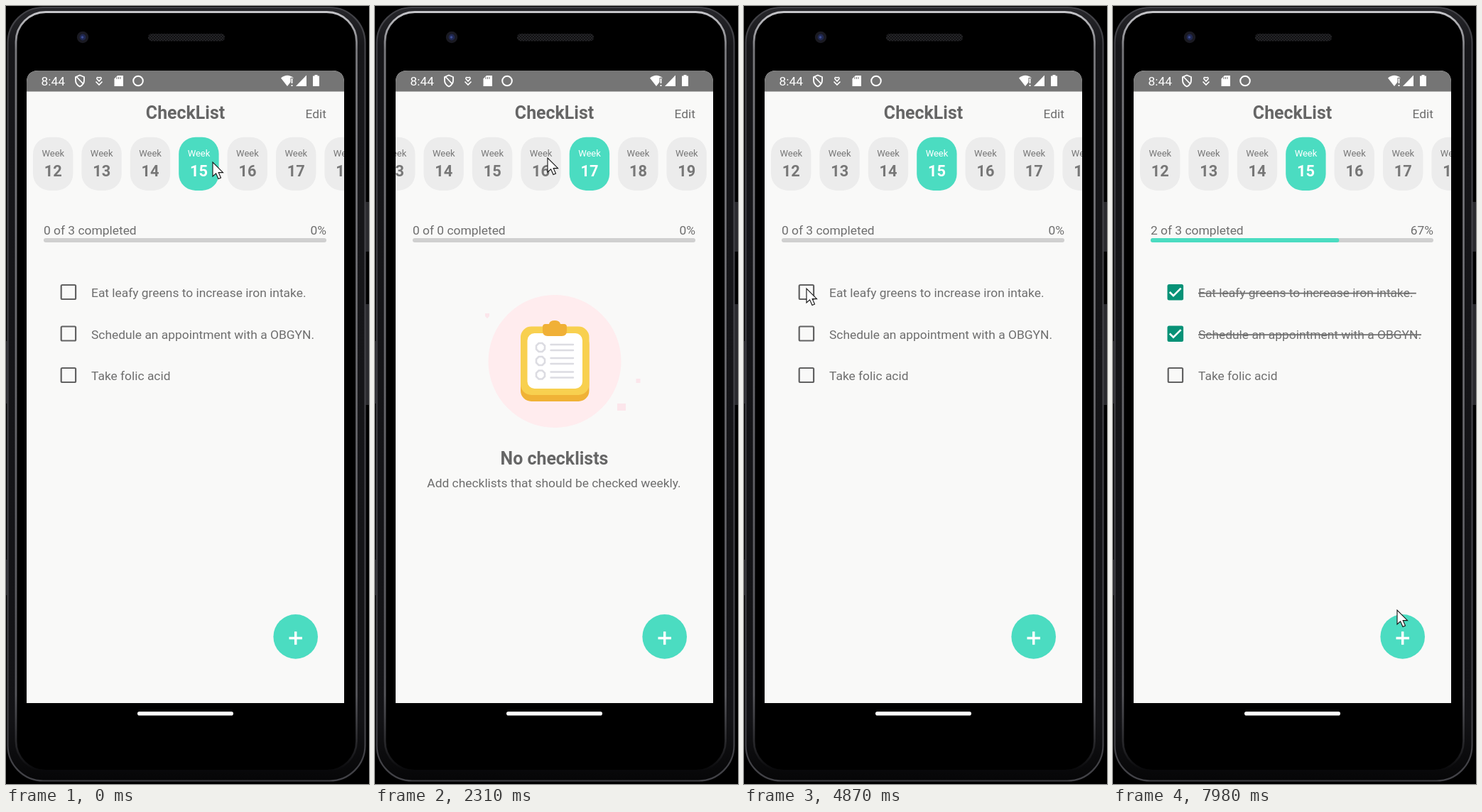
Animation of 511 by 1096 pixels, one loop 8000 ms. Source, as an HTML page:

```html
<!DOCTYPE html>
<html lang="en">
<head>
<meta charset="utf-8">
<title>Weekly checklist</title>
<style>
  html, body { margin: 0; width: 100%; height: 100%; overflow: hidden; background: #000; }
  svg { display: block; width: 100%; height: 100%; }
  text { font-family: Roboto, "Liberation Sans", sans-serif; font-size: 17.4px; fill: #6e6e6e; white-space: pre; }
  .title { font-size: 24.9px; font-weight: 700; fill: #666; }
  .done { text-decoration: line-through; }
  .week { font-size: 13px; text-anchor: middle; }
  .num { font-size: 21.8px; font-weight: 700; text-anchor: middle; }
  .mid { text-anchor: middle; }
  .end { text-anchor: end; }
</style>
</head>
<body>
<svg viewBox="0 0 511 1096" xmlns="http://www.w3.org/2000/svg">
  <defs>
    <clipPath id="screen"><path d="M29 982V108Q29 91 46 91H459Q476 91 476 108V982Z"/></clipPath>
    <linearGradient id="rim" x2="0" y2="1">
      <stop offset="0" stop-color="#c4c4c8"/><stop offset=".05" stop-color="#77777b"/>
      <stop offset=".9" stop-color="#55555a"/><stop offset=".97" stop-color="#222225"/>
      <stop offset="1" stop-color="#08080a"/>
    </linearGradient>
    <linearGradient id="metal" x2="0" y2="1">
      <stop offset="0" stop-color="#26262a"/><stop offset=".05" stop-color="#17171a"/>
      <stop offset=".92" stop-color="#131316"/><stop offset="1" stop-color="#060607"/>
    </linearGradient>
    <pattern id="mesh" width="4" height="4" patternUnits="userSpaceOnUse">
      <rect width="4" height="4" fill="#111113"/><path d="M0 0H2V2H0ZM2 2H4V4H2Z" fill="#252528"/>
    </pattern>
  </defs>

  <rect width="511" height="1096"/>
  <path d="M506 276h5v70h-5zM506 420h5v142h-5zM0 472h1.500v88H0zM0 780h1.500v50H0z" fill="#2a2a2e"/>
  <rect x="2.500" y="2" width="503" height="1089.500" rx="50" fill="url(#metal)" stroke="#424247" stroke-width="2.200"/>
  <rect x="14" y="8.500" width="479.500" height="1069" rx="42" stroke="url(#rim)" stroke-width="2.800"/>
  <circle cx="108" cy="44" r="8.200" fill="#1a1a22"/>
  <circle cx="108" cy="44" r="4.400" fill="#202850"/>
  <circle cx="107.500" cy="44" r="1.800" fill="#3d4d94"/>
  <rect x="200" y="39" width="108" height="10.500" rx="5" fill="url(#mesh)"/>
  <rect x="185" y="994" width="135" height="5.600" rx="2.800" fill="#fff"/>

  <g clip-path="url(#screen)">
    <rect x="29" y="91" width="447" height="891" fill="#f9f9f8"/>
    <rect x="29" y="91" width="447" height="29.500" fill="#757575"/>
    <text x="49.500" y="112" style="fill:#fff">8:44</text>
    <g fill="none" stroke="#fff" stroke-width="1.800">
      <path d="M104 97.500L110 100V105Q110 110.500 104 113.500Q98 110.500 98 105V100ZM99 99.500L109 110"/>
      <path d="M131 106L128 102.700Q127.500 99.500 131 101Q134.500 99.500 134 102.700ZM126.500 106.500L131 111L135.500 106.500" stroke-width="1.600"/>
      <circle cx="186" cy="105.500" r="6.800" stroke-width="2"/>
    </g>
    <g fill="#fff">
      <path d="M157 98H165V113H152.500V102.500Z"/>
      <path d="M387 101.500Q396 94 405 101.500L396 113Z"/>
      <path d="M423 97.500V113H408Z"/>
      <path d="M434.500 97H438.500V98.500H441V113H432V98.500H434.500Z"/>
    </g>
    <path d="M156 100v3M158.500 100v3M161 100v3" stroke="#757575"/>
    <path d="M402.500 101V109M402.500 110.500V113" stroke="#757575" stroke-width="4"/>
    <path d="M402.500 102V109M402.500 111V113" stroke="#fff" stroke-width="1.800"/>

    <text class="title mid" x="252.500" y="159">CheckList</text>
    <text class="end" x="451" y="157.500">Edit</text>
    <g id="weeks"></g>
    <text id="count" x="53" y="322"></text>
    <text id="percent" class="end" x="451" y="322"></text>
    <rect x="53" y="327" width="398" height="6" rx="3" fill="#d0d0d0"/>
    <rect id="bar" x="53" y="327" height="6" rx="3" fill="#4bdcc1"/>
    <g id="panels"></g>
    <circle cx="407.700" cy="888.400" r="31.300" fill="#4bdcc1"/>
    <path d="M398.500 890.500H417M407.700 881.300V899.700" stroke="#fff" stroke-width="3.500"/>
  </g>
  <path id="cursor" d="M0 0V20L4.600 15.800L8 23.500L11.500 22L8.200 14.600H14.500Z" fill="#fff" stroke="#111" stroke-width="1.100"/>
</svg>

<script>
const LOOP = 8000, PITCH = 68.4, TEAL = '#4bdcc1';
const $ = id => document.getElementById(id);

// Week taps: time, week chosen, resting centre of week 15 afterwards
const taps = [
  { t: 650, week: 16, x: 218.6 },
  { t: 1560, week: 17, x: 165.2 },
  { t: 3450, week: 15, x: 271.5 }
];
const checks = [5020, 5780];

// Pointer stops: time, x, y
const route = [
  [0, 291, 220], [150, 291, 220], [500, 334, 238], [1050, 336, 238],
  [1340, 374, 239], [1900, 373, 239], [2310, 243, 214], [2750, 188, 234],
  [3750, 189, 235], [4650, 88, 398], [5200, 88, 398], [5560, 88, 457],
  [5950, 88, 457], [6600, 433, 157], [7150, 433, 157], [7940, 400, 851], [8000, 400, 851]
];

const clamp = v => Math.min(1, Math.max(0, v));
const ease = v => (v = clamp(v), v < .5 ? 2 * v * v : 1 - 2 * (1 - v) ** 2);
const mix = (a, b, p) => a + (b - a) * p;

const line = (text, y, cls = '') => `<text class="${cls}" x="120" y="${y}">${text}</text>`;
const emptyBox = y =>
  `<rect x="77.700" y="${y - 10}" width="20.400" height="20" rx="1.500" fill="none" stroke="#626262" stroke-width="2.200"/>`;
const tickedBox = y =>
  `<rect x="76.500" y="${y - 11}" width="22.600" height="22.400" rx="2.500" fill="#079277"/>
   <path d="M79.800 ${y}l5.200 5.200l10.600 -10.600" fill="none" stroke="#fff" stroke-width="2.500"/>`;
const task = (text, y) =>
  `<g class="task"><g>${emptyBox(y)}${line(text, y + 7)}</g>
   <g>${tickedBox(y)}${line(text, y + 7, 'done')}</g></g>`;

const bullets = [481, 500, 519.5].map(y =>
  `<path d="M230.500 ${y - 6}h5l3.500 3.500v5l-3.500 3.500h-5l-3.500 -3.500v-5z" stroke-width="2.600"/>
   <path d="M247.500 ${y - 4}h31.500m0 8h-31.500" stroke-width="2.400" stroke-linecap="round"/>`).join('');

$('panels').innerHTML = `
  <g id="panel15">
    ${task('Eat leafy greens to increase iron intake. ', 403)}
    ${task('Schedule an appointment with a OBGYN.', 461.5)}
    ${emptyBox(520)}${line('Take folic acid', 527)}
  </g>
  <g id="panel16">
    ${emptyBox(405)}${line('Track your ovulation cycle to an idea of', 402)}${line('when you will be ovulating.', 422)}
    ${emptyBox(465.5)}${line('Study about symptoms of ovulation', 472.5)}
    ${emptyBox(524)}${line('Take folic acid', 531)}
  </g>
  <g id="panel17">
    <circle cx="253" cy="500.500" r="93.500" fill="#ffecee"/>
    <path d="M155 433h6v4l-3 3l-3 -3zM367.500 525h6v6h-6zM341 560h12v10h-12z" fill="#fce6eb"/>
    <rect x="205" y="461" width="96.500" height="96" rx="15" fill="#f0b236"/>
    <rect x="205" y="451.500" width="96.500" height="96.500" rx="15" fill="#f8d04f"/>
    <rect x="214.500" y="461" width="77.500" height="78" rx="10" fill="#fff"/>
    <path d="M240 448H245Q246 443 253 443Q260 443 261 448H266Q270 448 270 452V458Q270 465 263 465H243Q236 465 236 458V452Q236 448 240 448Z" fill="#f0b036"/>
    <g fill="none" stroke="#dcdce2">${bullets}</g>
    <text class="title mid" x="252.500" y="646">No checklists</text>
    <text class="mid" x="252" y="678">Add checklists that should be checked weekly.</text>
  </g>`;

const weekNumbers = Array.from({ length: 12 }, (_, i) => i + 10);
$('weeks').innerHTML = weekNumbers.map(n =>
  `<g><rect x="-28.300" y="184.700" width="56.400" height="75.200" rx="23.500"/>
   <text class="week" y="212">Week</text><text class="num" y="239.700">${n}</text></g>`).join('');
const pills = [...$('weeks').children];
const tasks = [...document.querySelectorAll('.task')];
const show = (el, on) => el.setAttribute('display', on ? 'inline' : 'none');

function pointerAt(t) {
  const i = Math.max(1, route.findIndex(stop => stop[0] > t));
  const [a, b] = [route[i - 1], route[i]];
  const p = ease((t - a[0]) / (b[0] - a[0]));
  return [mix(a[1], b[1], p), mix(a[2], b[2], p)];
}

// Fades out while held, then back in after release
function pressOpacity(week, t) {
  const tap = taps.find(k => k.week === week);
  if (!tap || t < tap.t - 120) return 1;
  return t < tap.t ? mix(1, .2, ease((t - tap.t + 120) / 100)) : mix(.2, 1, ease((t - tap.t) / 250));
}

function draw(t) {
  let current = 15, scroll = 271.5;
  for (const tap of taps) {
    if (t < tap.t) break;
    current = tap.week;
    scroll = mix(scroll, tap.x, ease((t - tap.t) / 420));
  }
  pills.forEach((pill, i) => {
    const n = weekNumbers[i], active = n === current;
    pill.setAttribute('transform', `translate(${scroll + (n - 15) * PITCH} 0)`);
    pill.setAttribute('opacity', pressOpacity(n, t));
    pill.children[0].setAttribute('fill', active ? TEAL : '#ececec');
    for (const label of [pill.children[1], pill.children[2]]) label.style.fill = active ? '#fff' : '#777';
  });

  for (const n of [15, 16, 17]) show($('panel' + n), n === current);
  tasks.forEach((el, i) => {
    show(el.children[0], t < checks[i]);
    show(el.children[1], t >= checks[i]);
  });

  const done = checks.filter(c => t >= c).length;
  $('count').textContent = `${done} of ${current === 17 ? 0 : 3} completed`;
  $('percent').textContent = Math.round(done / 3 * 100) + '%';
  $('bar').setAttribute('width', 398 * done / 3);
  $('cursor').setAttribute('transform', `translate(${pointerAt(t).join(' ')})`);
}

const start = performance.now();
function tick() {
  draw((performance.now() - start) % LOOP);
  requestAnimationFrame(tick);
}
tick();
</script>
</body>
</html>
```
